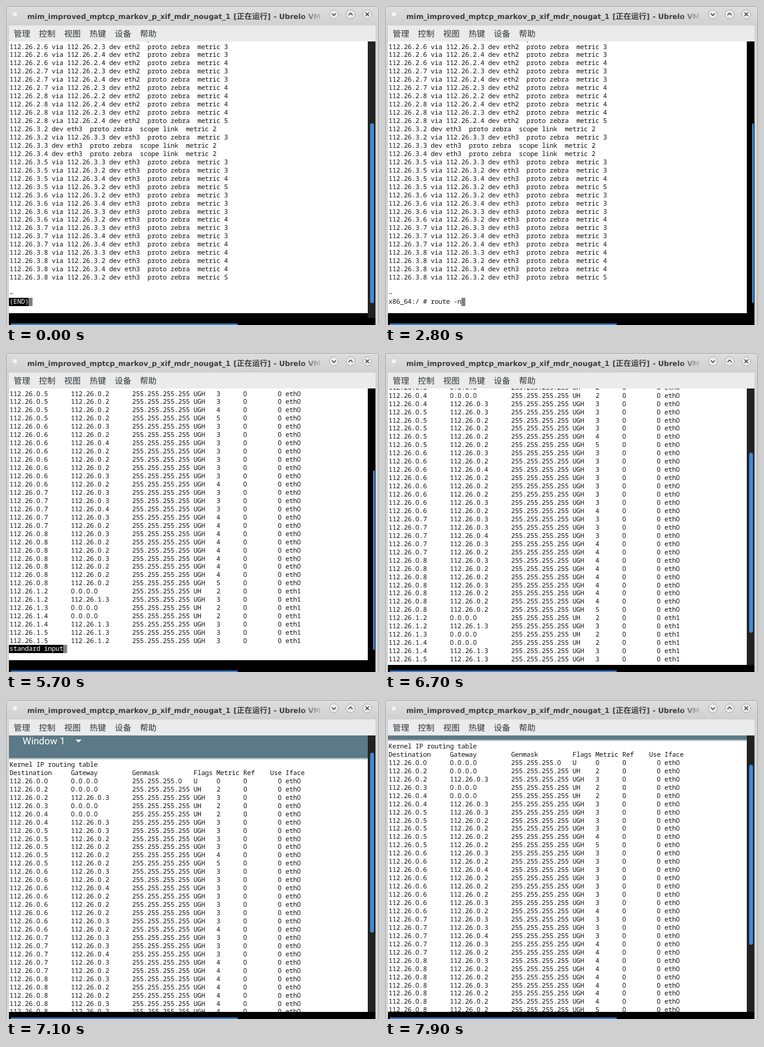
An HTML page that plays this animation: 632x540 px, repeating every 8 s.

```html
<!DOCTYPE html>
<html lang="zh">
<head>
<meta charset="utf-8">
<title>Routing table session</title>
<style>
  html, body { margin: 0; width: 100%; height: 100%; overflow: hidden; background: #d6d6d6; }
  svg { display: block; width: 632px; height: 540px; }
  text { white-space: pre; text-rendering: geometricPrecision; }
  .term { font: 500 11.2px "Noto Sans Mono", "DejaVu Sans Mono", monospace; letter-spacing: -.22px; fill: #111; }
  .zero { font-family: "Noto Sans", "Open Sans", sans-serif; letter-spacing: .094px; }
  .invert { fill: #fff; }
  .title { font: bold 12.07px "DejaVu Sans", sans-serif; fill: #3c3c3c; }
  .title .cjk { font: bold 13px "Noto Sans CJK SC", "Noto Sans CJK", sans-serif; }
  .menu { font: 14px "Noto Sans CJK SC", "Noto Sans CJK", sans-serif; fill: #2e3436; }
  .tab { font: 16.5px Roboto, sans-serif; fill: #fff; }
</style>
</head>
<body>
<svg viewBox="0 0 632 540">
  <defs>
    <linearGradient id="bar" x2="0" y2="1">
      <stop stop-color="#dedede"/><stop offset="1" stop-color="#d0d0d0"/>
    </linearGradient>
    <linearGradient id="fade" gradientUnits="userSpaceOnUse" x1="500" x2="538">
      <stop stop-color="#fff"/><stop offset="1" stop-color="#000"/>
    </linearGradient>
    <linearGradient id="shade" x2="0" y2="1">
      <stop stop-color="#9aa6ac"/><stop offset="1" stop-color="#fff"/>
    </linearGradient>
    <mask id="titleMask" maskUnits="userSpaceOnUse" x="0" y="0" width="540" height="33">
      <rect width="540" height="33" fill="url(#fade)"/>
    </mask>
    <clipPath id="view"><rect x="5" y="60" width="608" height="468"/></clipPath>
  </defs>

  <rect width="632" height="540" fill="#d4d4d4"/>
  <rect width="632" height="33" fill="url(#bar)"/>
  <path d="M.5 540V4Q.5.5 4 .5H628Q631.5.5 631.5 4V540" fill="none" stroke="#a4a4a4"/>
  <circle cx="15" cy="14" r="3.5" fill="#f4f4f4"/>
  <g class="title" mask="url(#titleMask)">
    <text x="36" y="21.5">mim_improved_mptcp_markov_p_xif_mdr_nougat_1</text>
    <text x="385.5" y="21.5">[<tspan class="cjk">正在运行</tspan>]</text>
    <text x="453.5" y="21.5">- Ubrelo VM</text>
  </g>
  <g id="buttons" fill="none" stroke="#444" stroke-width="1.6"></g>
  <rect x="5" y="33" width="621" height="27" fill="#ebebeb"/>
  <g id="menu" class="menu"></g>

  <rect x="5" y="60" width="621" height="480" fill="#000"/>
  <g clip-path="url(#view)">
    <g id="screen">
      <rect x="5" y="-68" width="608" height="588" fill="#fff"/>
      <rect x="5" y="-130" width="608" height="62.5" fill="#5b7986"/>
      <rect x="5" y="-67.5" width="608" height="3" fill="url(#shade)"/>
      <text class="tab" x="28" y="-91">Window 1</text>
      <path d="M118-99h10l-5 5z" fill="#fff"/>
      <g id="links" class="term"></g>
      <g id="table" class="term"></g>
      <rect id="status" x="5" y="494" height="14" fill="#000"/>
      <text id="line" class="term" x="6"></text>
      <rect id="cursor" width="6.5" height="14" fill="#808080"/>
    </g>
  </g>
  <rect id="track" x="613" y="60" width="13" height="468"/>
  <rect id="thumb" height="304.5" rx="3" fill="#418ad6"/>
  <rect x="8" y="537.5" width="384.5" height="4" fill="#3d82cc"/>
</svg>

<script>
const LOOP = 8000, STEP = 100, CELL = 6.5, ROW = 13.95, LAST_ROW = 31;
const PROMPT = 'x86_64:/ # ';
const $ = id => document.getElementById(id);
const baseline = row => 72.5 + row * ROW;
const rowText = (string, row) =>
  `<text x="6" y="${baseline(row).toFixed(2)}">${string.replace(/0/g, '<tspan class="zero">0</tspan>')}</text>`;

// Each network: host, then gateway + metric pairs; "-" marks a direct link.
const linkRoutes = {
  2: '6:23 33 43 44|7:33 43 34|8:24 44 34 45',
  3: '2:-2 33|3:-2|4:-2|5:33 23 44 25|6:23 43 33 24|7:33 43 44|8:34 24 44 25'
};
const tableRoutes = {
  0: '2:-2 33|3:-2|4:-2 33|5:33 23 23 24 25|6:33 23 43 23 23 23 33 24|7:33 33 43 34 24|8:34 24 24 34 24 24 25',
  1: '2:-2 33|3:-2|4:-2 33|5:33 23'
};

function expand(routes, format) {
  return Object.entries(routes).flatMap(([net, spec]) =>
    spec.split('|').flatMap(entry => {
      const [host, hops] = entry.split(':');
      return hops.split(' ').map(([via, metric]) => format(net, host, via, metric));
    }));
}

const address = (net, host) => `112.26.${net}.${host}`;

const linkLine = (net, host, via, metric) => via === '-'
  ? `${address(net, host)} dev eth${net}  proto zebra  scope link  metric ${metric}`
  : `${address(net, host)} via ${address(net, via)} dev eth${net}  proto zebra  metric ${metric}`;

const columns = (target, gateway, mask, flags, metric, ref, use, iface) =>
  target.padEnd(16) + gateway.padEnd(16) + mask.padEnd(16) + flags.padEnd(6) +
  metric.padEnd(7) + ref.padEnd(6) + use.padStart(4) + ' ' + iface;

const tableLine = (net, host, via, metric) => columns(
  address(net, host), via === '-' ? '0.0.0.0' : address(net, via), '255.255.255.255',
  via === '-' ? 'UH' : 'UGH', metric, '0', '0', 'eth' + net);

const tableLines = [
  'Kernel IP routing table',
  columns('Destination', 'Gateway', 'Genmask', 'Flags', 'Metric', 'Ref', 'Use', 'Iface'),
  columns('112.26.0.0', '0.0.0.0', '255.255.255.0', 'U', '0', '0', '0', 'eth0'),
  ...expand(tableRoutes, tableLine)
];

$('links').innerHTML =
  expand(linkRoutes, linkLine).map((s, i) => rowText(s, i - 1)).join('') + rowText('~', 30);
$('table').innerHTML = tableLines.map((s, i) => rowText(s, i - 9)).join('');
$('menu').innerHTML = ['管理', '控制', '视图', '热键', '设备', '帮助']
  .map((label, i) => `<text x="${13 + i * 42.8}" y="52">${label}</text>`).join('');
$('buttons').innerHTML = ['M-3.5-1.5L0 2L3.5-1.5', 'M-3.5 1.5L0-2L3.5 1.5', 'M-3-3L3 3M3-3L-3 3']
  .map((icon, i) => `<g transform="translate(${555.5 + i * 28.3} 14)">
    <circle r="7.5" fill="#ececec" stroke="#a8a8a8" stroke-width="1"/><path d="${icon}"/></g>`).join('');

const commands = [
  [700, ''], [1500, 'ip route show|less'], [2000, 'ip route|less'], [2800, 'route -n'],
  [3600, 'route -n|'], [4300, 'route -n|l'], [4400, 'route -n|le'],
  [4600, 'route -n|les'], [4800, 'route -n|less']
];
const ENTER = 4900, OUTPUT = 5000;
const scrollKeys = [[6500, 0], [6600, 12], [6700, 45], [7100, 166], [7400, 160], [7600, 135]];
const hoverKeys = [[500, 1], [900, 0], [5700, 0], [6100, 1]];

function sample(keys, t) {
  if (t <= keys[0][0]) return keys[0][1];
  for (let i = 1; i < keys.length; i++) {
    const [t0, v0] = keys[i - 1], [t1, v1] = keys[i];
    if (t <= t1) return v0 + (v1 - v0) * (t - t0) / (t1 - t0);
  }
  return keys.at(-1)[1];
}

function set(id, attributes) {
  for (const name in attributes) $(id).setAttribute(name, attributes[name]);
}

function drawTerminal(t) {
  const paging = t < commands[0][0] || t >= OUTPUT;
  const entered = t >= ENTER && t < OUTPUT;
  const command = commands.findLast(([start]) => start <= t);
  const line = !paging ? PROMPT + command[1] : t < OUTPUT ? '(END)' : 'standard input';
  const end = 6 + line.length * CELL;

  $('links').style.display = t < OUTPUT ? '' : 'none';
  $('table').style.display = t < OUTPUT ? 'none' : '';
  set('links', { transform: `translate(0 ${entered ? -ROW : 0})` });
  set('status', { width: paging ? end - 5 : 0 });
  set('line', { y: baseline(entered ? LAST_ROW - 1 : LAST_ROW) - .7, class: paging ? 'term invert' : 'term' });
  $('line').textContent = line;
  set('cursor', { x: entered ? 6 : end, y: 494 });
}

function drawScroll(t) {
  const scroll = sample(scrollKeys, t), hover = sample(hoverKeys, t);
  const shade = Math.round(34 * hover);
  set('screen', { transform: `translate(0 ${scroll})` });
  set('track', { fill: `rgb(${shade},${shade},${shade})` });
  set('thumb', { x: 622 - 5 * hover, y: 198.5 - scroll / 1.52, width: 3 + 3.5 * hover });
}

function render(now) {
  const t = Math.floor((now % LOOP) / STEP) * STEP;
  drawTerminal(t);
  drawScroll(t);
}

const start = performance.now();
function tick() {
  render(performance.now() - start);
  requestAnimationFrame(tick);
}
tick();
</script>
</body>
</html>
```
